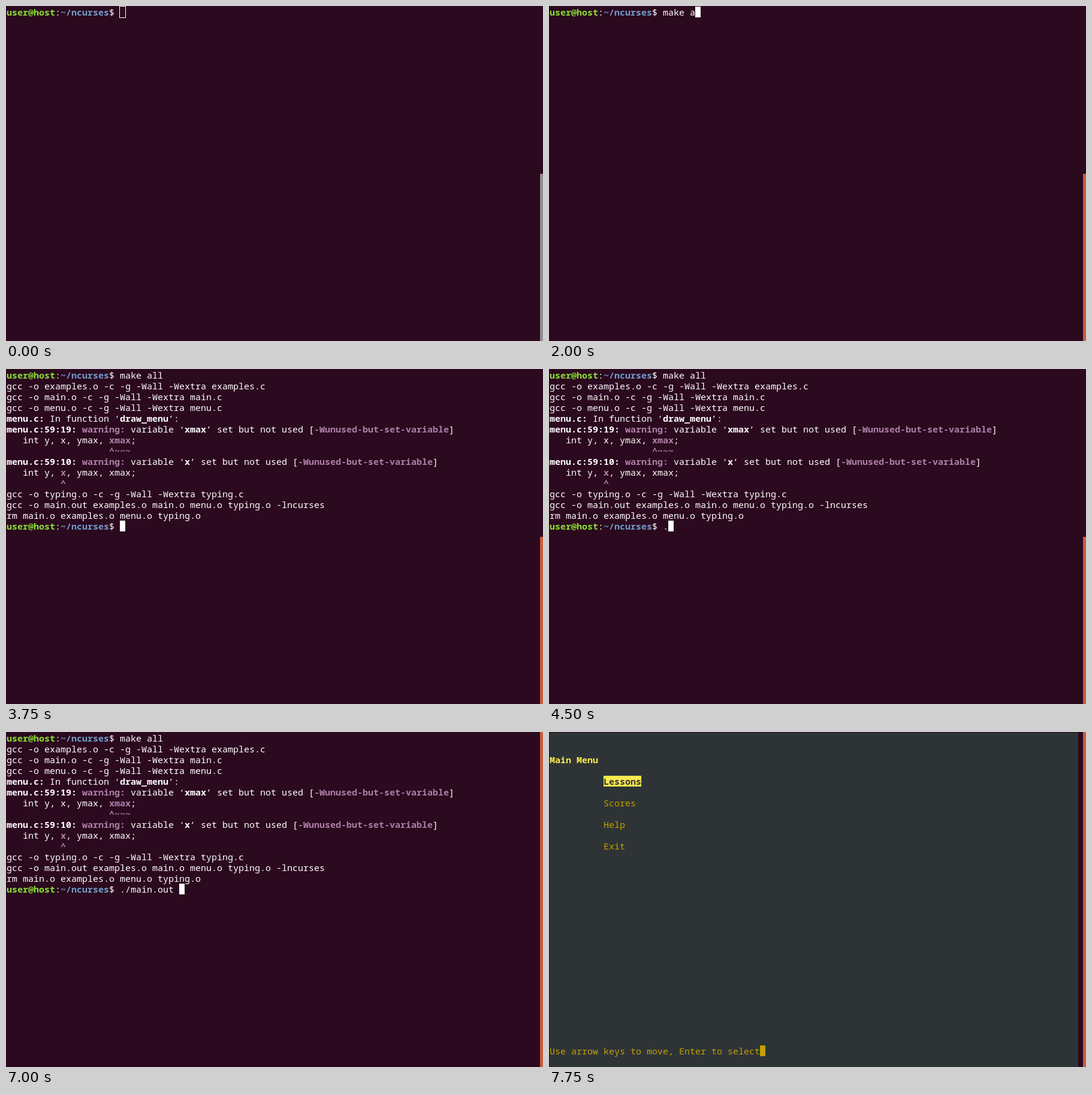
Recreate the animation shown at these times as an HTML page. Size 896 by 559 pixels, loop 8000 ms.

```html
<!DOCTYPE html>
<html lang="en">
<head>
<meta charset="utf-8">
<title>Terminal session</title>
<style>
  html, body { margin: 0; width: 100%; height: 100%; overflow: hidden; background: #2b091e; }
  #stage { position: relative; width: 896px; height: 559px; overflow: hidden; }
  #stage > * { position: absolute; }
  pre {
    margin: 0; left: 1px; top: 1px; width: 882px; height: 558px; color: #fff;
    font: 15px/18px "Noto Sans Mono", "DejaVu Sans Mono", monospace;
    font-variant-ligatures: none;
  }
  pre div { height: 18px; }
  pre.menu { background: #2e3436; color: #c4a000; }
  b { font-weight: 700; }
  .green { color: #8ae234; }
  .blue { color: #729fcf; }
  .plum { color: #ad7fa8; }
  .title { color: #fce94f; }
  .picked { display: inline-block; height: 18px; background: #fce94f; color: #2e3436; }
  #cursor { width: 9px; height: 18px; background: #fff; }
  #cursor.hollow { box-sizing: border-box; width: 11px; height: 20px; margin: -1px; background: none; border: 1px solid #fff; }
  #bar { left: 891px; width: 5px; bottom: 0; }
</style>
</head>
<body>
<div id="stage">
  <pre id="screen"></pre>
  <div id="cursor"></div>
  <div id="bar"></div>
  <svg id="pointer" width="7" height="17" fill="none" stroke="#fff">
    <path d="M0 .5H2.5L3.5 1.5L4.5 .5H7M3.5 1V16M0 16.5H2.5L3.5 15.5L4.5 16.5H7"/>
  </svg>
</div>
<script>
const LOOP = 8000, CELL = 9, ROW = 18, PROMPT_COLS = 21;
const $ = id => document.getElementById(id);
const screen = $('screen'), cursor = $('cursor'), bar = $('bar'), pointer = $('pointer');

const bold = (text, cls = '') => `<b class="${cls}">${text}</b>`;
const prompt = typed => bold('user@host', 'green') + ':' + bold('~/ncurses', 'blue') + '$ ' + typed;
const compile = name => `gcc -o ${name}.o -c -g -Wall -Wextra ${name}.c`;
const warning = (col, name) =>
  bold(`menu.c:59:${col}:`) + ' ' + bold('warning:', 'plum') +
  ` variable ‘${bold(name)}’ set but not used [${bold('-Wunused-but-set-variable', 'plum')}]`;

const warnings = [
  compile('examples'), compile('main'), compile('menu'),
  bold('menu.c:') + ` In function ‘${bold('draw_menu')}’:`,
  warning(19, 'xmax'),
  `   int y, x, ymax, ${bold('xmax', 'plum')};`,
  ' '.repeat(19) + bold('^~~~', 'plum'),
  warning(10, 'x'),
  `   int y, ${bold('x', 'plum')}, ymax, xmax;`,
  ' '.repeat(10) + bold('^', 'plum')
];
const linking = [
  compile('typing'),
  'gcc -o main.out examples.o main.o menu.o typing.o -lncurses',
  'rm main.o examples.o menu.o typing.o'
];

const hint = 'Use arrow keys to move, Enter to select';
const menu = Array(30).fill('');
menu[2] = bold('Main Menu', 'title');
menu[4] = ' '.repeat(10) + bold('Lessons', 'picked');
['Scores', 'Help', 'Exit'].forEach((item, i) => menu[6 + 2 * i] = ' '.repeat(10) + item);
menu[29] = hint;

const shell = (typed, on = true) => ({ lines: [prompt(typed)], row: 0, col: PROMPT_COLS + typed.length, on });
const built = (typed, on = true) => ({
  lines: [prompt('make all'), ...warnings, ...linking, prompt(typed)],
  row: 14, col: PROMPT_COLS + typed.length, on
});

const steps = [
  [0, shell('')],
  [1250, shell('', false)],
  [1500, shell('ma')],
  [1750, shell('mak')],
  [2000, shell('make a')],
  [2250, shell('make al')],
  [2500, shell('make all ')],
  [2750, { lines: [prompt('make all'), ...warnings], row: 11, col: 0, on: true }],
  [3000, built('')],
  [3500, built('', false)],
  [3750, built('')],
  [4500, built('.')],
  [5000, built('./')],
  [5500, built('.')],
  [5750, built('.', false)],
  [6250, built('./')],
  [7000, built('./main.out ')],
  [7500, { lines: menu, row: 29, col: hint.length, on: true, menu: true }]
];

let shown;
function draw(t) {
  const state = steps.findLast(([start]) => t >= start)[1];
  if (state !== shown) {
    shown = state;
    screen.className = state.menu ? 'menu' : '';
    screen.innerHTML = state.lines.map(line => `<div>${line}</div>`).join('');
    cursor.style.left = 1 + state.col * CELL + 'px';
    cursor.style.top = 1 + state.row * ROW + 'px';
    cursor.style.visibility = state.on ? 'visible' : 'hidden';
    cursor.style.background = state.menu ? '#c4a000' : '';
  }
  cursor.className = t < 750 ? 'hollow' : '';
  bar.style.top = t < 7000 ? '280px' : '0';
  bar.style.background = t < 1000 ? '#948c91' : '#cb5b3b';
  pointer.style.visibility = t >= 500 && t < 1500 ? 'visible' : 'hidden';
  pointer.style.left = t < 750 ? '215px' : '222px';
  pointer.style.top = t < 750 ? '25px' : '33px';
}

const begin = performance.now();
function tick() {
  draw((performance.now() - begin) % LOOP);
  requestAnimationFrame(tick);
}
tick();
</script>
</body>
</html>
```
